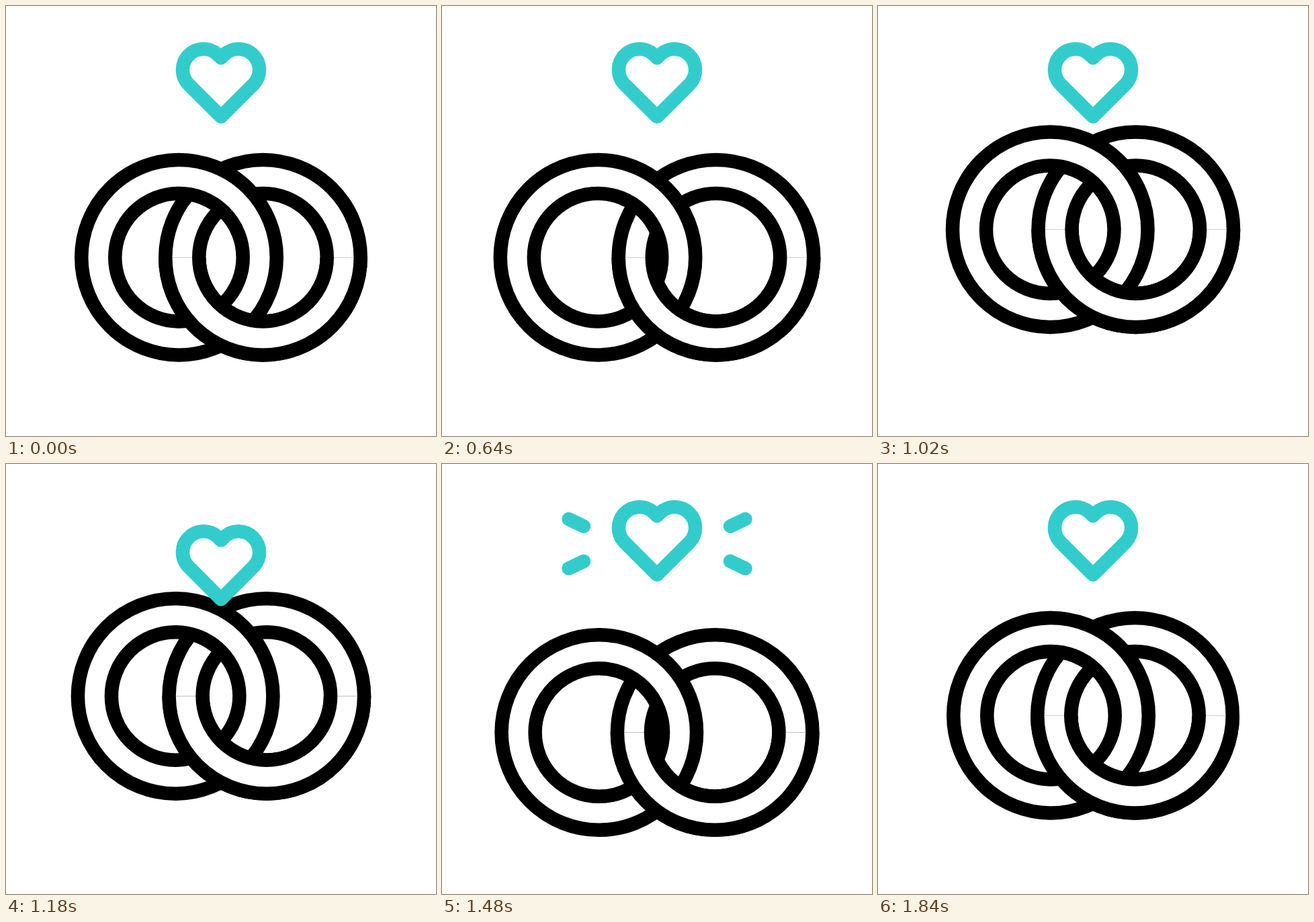
An HTML page for the animation above (2.48 s loop, 640 by 640 pixels).

```html
<!DOCTYPE html>
<html lang="en">
<head>
<meta charset="utf-8">
<title>Linked rings</title>
<style>
  html, body { margin: 0; height: 100%; overflow: hidden; background: #fff; }
  svg { display: block; width: 100%; height: 100%; }
  .teal { fill: none; stroke: #3cc; stroke-width: 20.5; stroke-linecap: round; stroke-linejoin: round; }
</style>
</head>
<body>
<svg viewBox="0 0 640 640">
  <defs>
    <g id="ring" fill="none">
      <circle r="120.25" stroke="#000" stroke-width="70.5"/>
      <circle r="120.25" stroke="#fff" stroke-width="29.5"/>
    </g>
    <line id="spark"/>
    <clipPath id="lower"><rect x="-320" width="640" height="200"/></clipPath>
  </defs>
  <!-- The left ring passes over at the top, the right ring at the bottom. -->
  <g id="rings">
    <use href="#ring" class="right"/>
    <use href="#ring" class="left"/>
    <g clip-path="url(#lower)"><use href="#ring" class="right"/></g>
  </g>
  <path id="heart" class="teal" d="M320 164.8L271.1 115.9A31 31 0 0 1 314.9 72.1L320 77.2L325.1 72.1A31 31 0 0 1 368.9 115.9Z"/>
  <g id="sparks" class="teal" transform="translate(320 118.7)">
    <use href="#spark"/>
    <use href="#spark" transform="scale(-1 1)"/>
    <use href="#spark" transform="scale(1 -1)"/>
    <use href="#spark" transform="scale(-1 -1)"/>
  </g>
</svg>
<script>
const LOOP = 2480;
const $ = id => document.getElementById(id);

// Each track is a list of [time, value], eased in and out between keys.
const gap = [[0, 62.5], [650, 88], [1083, 62.5], [1407, 88], [1840, 62.5]];
const ringY = [[650, 374.2], [1083, 330.6], [1407, 401.5], [1840, 374.2]];
const heartY = [[1083, 0], [1245, 55], [1400, -15], [1480, 0]];
const sparkHead = [[1320, 0], [1450, 1]];
const sparkTail = [[1500, 0], [1630, 1]];

function at(keys, t) {
  const i = keys.findIndex(k => k[0] > t);
  if (i < 0) return keys[keys.length - 1][1];
  if (i === 0) return keys[0][1];
  const [t0, a] = keys[i - 1], [t1, b] = keys[i];
  return a + (b - a) * (1 - Math.cos(Math.PI * (t - t0) / (t1 - t0))) / 2;
}

function setEnd(n, p) {
  $('spark').setAttribute('x' + n, -109 - 22.5 * p);
  $('spark').setAttribute('y' + n, -26 - 10.7 * p);
}

function draw(t) {
  const d = at(gap, t);
  document.querySelectorAll('.left').forEach(e => e.setAttribute('x', -d));
  document.querySelectorAll('.right').forEach(e => e.setAttribute('x', d));
  $('rings').setAttribute('transform', `translate(320 ${at(ringY, t)})`);
  $('heart').setAttribute('transform', `translate(0 ${at(heartY, t)})`);

  const head = at(sparkHead, t), tail = at(sparkTail, t);
  setEnd(1, tail);
  setEnd(2, head);
  $('sparks').style.display = head > tail ? '' : 'none';
}

const start = performance.now();
function tick() {
  draw((performance.now() - start) % LOOP);
  requestAnimationFrame(tick);
}
tick();
</script>
</body>
</html>
```
